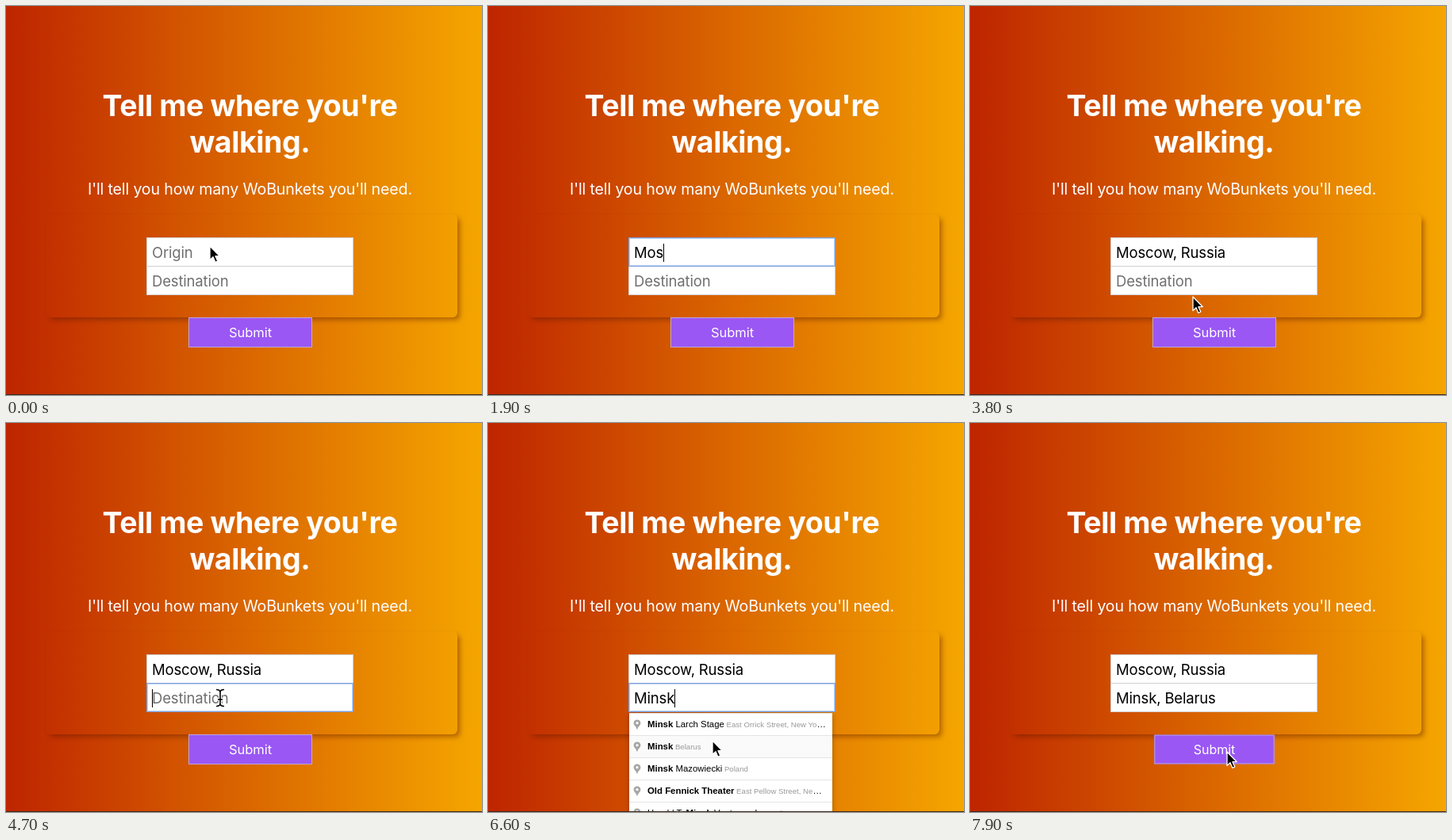
These frames come from a looping animation (600x491 px, 8000 ms). An HTML page:

```html
<!DOCTYPE html>
<html lang="en">
<head>
<meta charset="utf-8">
<title>Walking calculator</title>
<style>
  html, body { margin: 0; width: 100%; height: 100%; overflow: hidden; }
  body { font-family: Inter, "Open Sans", sans-serif; font-optical-sizing: none; }
  #stage {
    position: relative; width: 600px; height: 491px; overflow: hidden;
    background: linear-gradient(90deg, #be2500, #f5a600);
  }
  #stage > * { position: absolute; box-sizing: border-box; }
  #base { left: 0; bottom: 0; z-index: 3; width: 600px; height: 1px; background: #3b2a20; }
  #card {
    left: 50px; top: 263px; width: 519px; height: 130px; border-radius: 6px;
    box-shadow: 4px 4px 6px -1px rgba(90, 25, 0, .45);
  }
  h1, p { left: 15px; width: 585px; margin: 0; text-align: center; color: #fff; white-space: nowrap; }
  h1 { top: 103px; font-size: 37.5px; line-height: 46px; font-weight: 700; letter-spacing: -.4px; }
  p { top: 217px; font-size: 19.6px; line-height: 28px; letter-spacing: -.15px; }
  .field {
    left: 177px; width: 261px; height: 37px; padding-left: 6px;
    border: 1px solid #d3cfd3; background: #fff; color: #000;
    font-size: 18.5px; line-height: 36px; letter-spacing: -.17px; white-space: pre;
  }
  .field.empty { color: #6f6f6f; }
  .field.focus { z-index: 1; border-color: #7d9fd8; box-shadow: inset 0 0 0 1px #bcd1f2; }
  .caret {
    display: inline-block; width: 1px; height: 23px; margin-right: -1px;
    vertical-align: middle; background: #000; position: relative; top: -1px;
  }
  #origin { top: 292px; }
  #dest { top: 328px; }
  #submit {
    left: 230px; top: 393px; width: 156px; height: 38px;
    border: 1px solid #bda6e2; background: #9a57f4; color: #fff;
    font-size: 16.5px; line-height: 36px; letter-spacing: -.05px; text-align: center;
  }
  #submit.hover { transform: scale(.97); }
  .list {
    left: 178px; width: 256px; z-index: 2; background: #fff; display: none;
    box-shadow: 0 2px 6px rgba(0, 0, 0, .3);
    font: 11.4px/27px "Liberation Sans", Arial, sans-serif; color: #000;
  }
  .row {
    position: relative; box-sizing: border-box; height: 28px; padding: 0 8px 0 23px;
    border-top: 1px solid #e4e4e4; overflow: hidden; white-space: nowrap; text-overflow: ellipsis;
  }
  .row.hover { background: #fafafa; }
  .row svg { position: absolute; left: 5px; top: 7px; }
  .row small { margin-left: 2.6px; font-size: 9.65px; color: #999; }
  .credit { position: relative; height: 16px; padding-left: 149px; font-size: 11.8px; line-height: 13px; color: #666; }
  .credit i { position: absolute; left: 227px; top: 0; width: 13px; height: 13px; border-radius: 50%; background: #4285f4; }
  #pointer { left: 0; top: 0; z-index: 3; overflow: visible; }
</style>
</head>
<body>
<div id="stage">
  <div id="card"></div>
  <h1>Tell me where you're<br>walking.</h1>
  <p>I'll tell you how many WoBunkets you'll need.</p>
  <div id="origin" class="field"></div>
  <div id="dest" class="field"></div>
  <div id="submit">Submit</div>
  <div id="base"></div>
  <svg id="pointer" width="1" height="1" stroke="#fff" stroke-linejoin="round">
    <path id="arrow" stroke-width="1.3" d="M0 0V17.5L4 13.8L6.8 20.3L9.8 19L7 12.7H12.4Z"/>
    <g id="beam" fill="none">
      <path stroke-width="4" d="M-5-10.5Q0-10.5 0-7Q0-10.5 5-10.5M0-8V8M-5 10.5Q0 10.5 0 7Q0 10.5 5 10.5M-3 2H3"/>
      <path stroke="#000" stroke-width="1.6" d="M-5-10.5Q0-10.5 0-7Q0-10.5 5-10.5M0-8V8M-5 10.5Q0 10.5 0 7Q0 10.5 5 10.5M-3 2H3"/>
    </g>
  </svg>
</div>
<script>
const LOOP = 8000, STEP = 100;
const $ = id => document.getElementById(id);
const stage = $('stage');

const PIN = '<svg width="10" height="14"><path fill="#a6a6a6" fill-rule="evenodd" ' +
  'd="M5 .5C2.4.5.6 2.3.6 4.8C.6 8 4 9 5 13.5C6 9 9.4 8 9.4 4.8C9.4 2.3 7.6.5 5 .5ZM5 3.1A1.6 1.6 0 1 1 5 6.3A1.6 1.6 0 1 1 5 3.1Z"/></svg>';

// Each row is "name|place"; asterisks mark the bold part.
function makeList(top, rows) {
  const list = document.createElement('div');
  list.className = 'list';
  list.style.top = top + 'px';
  list.innerHTML = rows.map(row => {
    const [name, place] = row.split('|');
    return `<div class="row">${PIN}${name.replace(/\*(.+?)\*/, '<b>$1</b>')}<small>${place}</small></div>`;
  }).join('') + '<div class="credit">powered by<i></i></div>';
  stage.append(list);
  return list;
}

const lists = [
  { from: 2300, to: 3500, el: makeList(330, [
    '*Moscow*|PA, USA',
    '*Moscow*|Russia',
    '*Moscow*|ID, USA',
    '*Moscow* Nook|Brooklyn NY, Tarrowmere Boardwalk, NY, USA',
    '*Moscow* by the Lantern|East Quillow Lane, New York, NY, USA']) },
  { from: 5100, to: 5800, el: makeList(366, [
    '*M*anhattan|New York, NY, USA',
    '*M*ontclair|NJ, USA',
    '*M*aspeth|Queens, NY, USA',
    '*M*ellowick Fern Garden|Quenterville Plaza, New York, NY, USA',
    '*M*irrowdale Medical Center|Tenlow Avenue, Brooklyn, NY, USA']) },
  { from: 5800, to: 6900, el: makeList(366, [
    '*Minsk* Larch Stage|East Orrick Street, New York, NY, USA',
    '*Minsk*|Belarus',
    '*Minsk* Mazowiecki|Poland',
    '*Old Fennick Theater*|East Pellow Street, New York, NY, USA',
    'Harold T. *Minsk* Ventures, Inc.|Tellow Avenue, New York, NY, USA']) }
];

const fields = [
  { el: $('origin'), hint: 'Origin', word: 'Moscow', full: 'Moscow, Russia',
    keys: [1500, 1700, 1800, 2000, 2200, 2400], focus: 800, pick: 3500 },
  { el: $('dest'), hint: 'Destination', word: 'Minsk', full: 'Minsk, Belarus',
    keys: [4800, 5000, 5200, 5400, 5600], focus: 4300, pick: 6900 }
];

// Pointer stops: time, x, y, and the shape shown from then on.
const path = [
  [0, 257, 303, 'arrow'], [500, 257, 303, 'beam'], [800, 255, 311, 'beam'],
  [1500, 255, 311, ''], [2600, 200, 215, 'beam'], [2900, 190, 237, 'beam'],
  [3000, 194, 262, 'arrow'], [3300, 260, 368, 'arrow'], [3600, 262, 369, 'arrow'],
  [3800, 281, 367, 'arrow'], [4100, 270, 347, 'beam'], [4800, 270, 347, ''],
  [6000, 272, 350, 'beam'], [6200, 276, 372, 'arrow'], [6500, 283, 401, 'arrow'],
  [6900, 283, 401, 'arrow'], [7500, 324, 415, 'arrow'], [LOOP, 324, 415, 'arrow']
];

function drawField(f, t) {
  const typed = f.keys.filter(k => k <= t);
  const text = t >= f.pick ? f.full : f.word.slice(0, typed.length);
  const focus = t >= f.focus && t < f.pick;
  const since = t - (typed.length ? typed[typed.length - 1] : f.focus);
  f.el.className = 'field' + (text ? '' : ' empty') + (focus ? ' focus' : '');
  const caret = focus && since % 1000 < 500 ? '<span class="caret"></span>' : '';
  f.el.innerHTML = text ? text + caret : caret + f.hint;
}

function drawPointer(t) {
  const i = path.findIndex(p => p[0] > t);
  const [t0, x0, y0, shape] = path[i - 1], [t1, x1, y1] = path[i];
  const u = (t - t0) / (t1 - t0), e = u * u * (3 - 2 * u);
  const x = x0 + (x1 - x0) * e, y = y0 + (y1 - y0) * e;
  $('pointer').style.transform = `translate(${x}px, ${y}px)`;
  for (const id of ['arrow', 'beam']) $(id).style.display = id === shape ? '' : 'none';
  return y;
}

function draw(t) {
  fields.forEach(f => drawField(f, t));
  const y = drawPointer(t);
  for (const { from, to, el } of lists) {
    el.style.display = t >= from && t < to ? 'block' : 'none';
    const over = Math.floor((y - parseInt(el.style.top)) / 28);
    [...el.querySelectorAll('.row')].forEach((row, i) => row.classList.toggle('hover', i === over));
  }
  $('submit').classList.toggle('hover', t >= 7500);
}

const start = performance.now();
let last = -1;
function tick() {
  const t = Math.floor((performance.now() - start) % LOOP / STEP) * STEP;
  if (t !== last) draw(last = t);
  requestAnimationFrame(tick);
}
tick();
</script>
</body>
</html>
```
